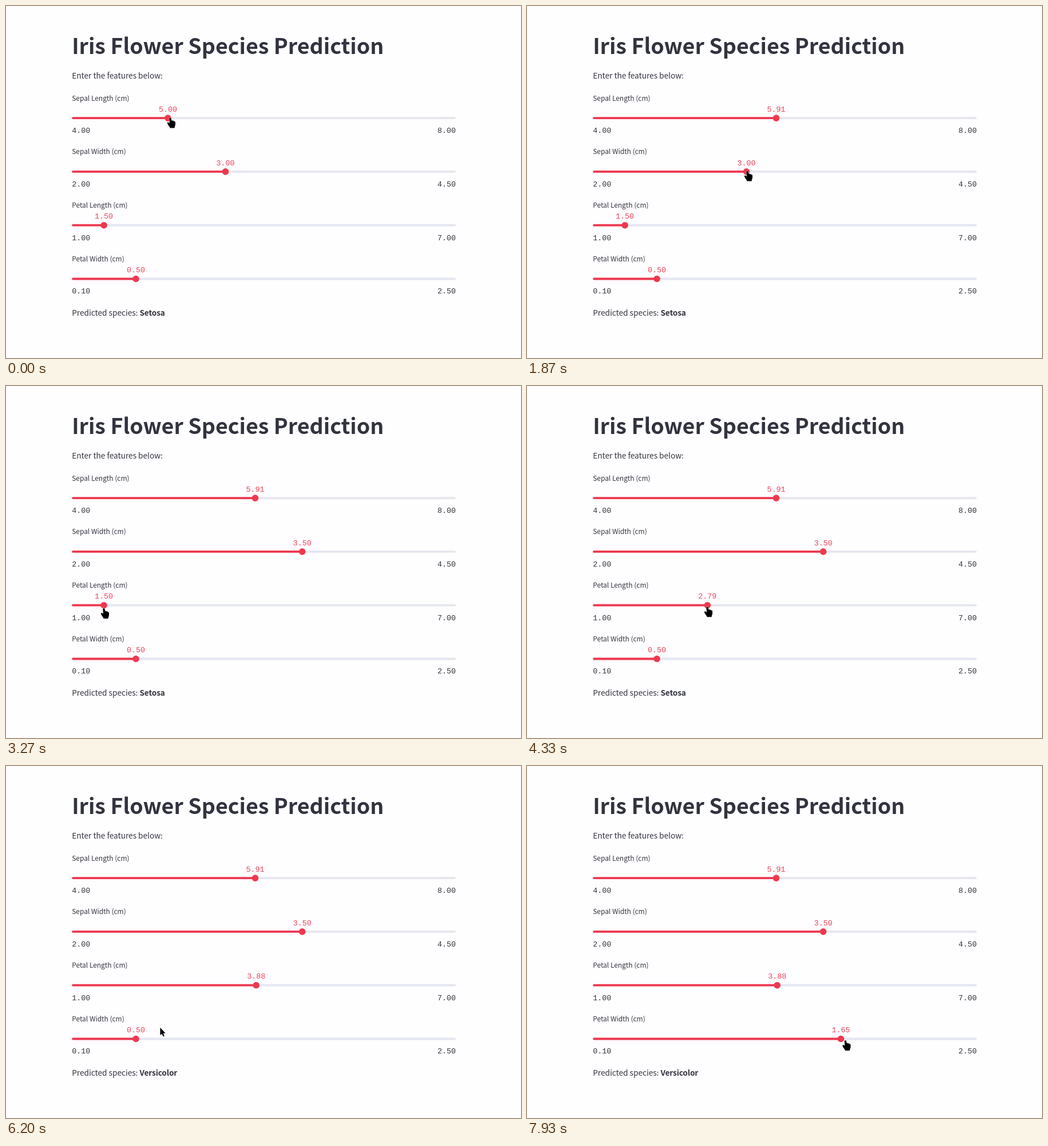
An HTML page for the animation above (8 s loop, 900 px wide and 616 px high).

```html
<!DOCTYPE html>
<html lang="en">
<head>
<meta charset="utf-8">
<title>Iris Flower Species Prediction</title>
<style>
  html, body { margin: 0; width: 100%; height: 100%; overflow: hidden; background: #fefdff; }
  svg { display: block; width: 900px; height: 616px; }
  text { font-family: "Noto Sans CJK JP", "Noto Sans CJK SC", "Noto Sans", sans-serif; fill: #31333f; white-space: pre; }
  .title { font-size: 37.55px; font-weight: 700; }
  .body { font-size: 13.65px; }
  .bold { font-weight: 600; letter-spacing: -0.12px; }
  .label { font-size: 11.95px; }
  .num { font-family: "Liberation Mono", monospace; font-size: 13.34px; }
  .value { fill: #ec4358; text-anchor: middle; }
  .end { text-anchor: end; }
  .cursor { fill: #000; stroke: #fff; stroke-width: 1; paint-order: stroke; stroke-linejoin: round; }
</style>
</head>
<body>
<svg id="stage" viewBox="0 0 900 616"></svg>
<script>
const LOOP = 8000, STEP = 1000 / 15;
const LEFT = 115.2, RIGHT = 786, RED = '#ee384e';
const stage = document.getElementById('stage');

function add(tag, attrs, text) {
  const node = document.createElementNS('http://www.w3.org/2000/svg', tag);
  for (const key in attrs) node.setAttribute(key, attrs[key]);
  if (text !== undefined) node.textContent = text;
  return stage.appendChild(node);
}
const label = (cls, x, y, text) => add('text', { class: cls, x, y }, text);

// Keys are [time, ...values], eased between neighbours.
function at(keys, t) {
  let i = 0;
  while (i < keys.length - 1 && t >= keys[i + 1][0]) i++;
  const a = keys[i], b = keys[i + 1];
  if (!b || t <= a[0]) return a.slice(1);
  const u = (t - a[0]) / (b[0] - a[0]);
  const e = u * u * (3 - 2 * u);
  return a.slice(1).map((v, k) => v + (b[k + 1] - v) * e);
}

const specs = [
  { name: 'Sepal Length (cm)', min: 4, max: 8, keys: [[130, 5], [870, 5.91]] },
  { name: 'Sepal Width (cm)', min: 2, max: 4.5, keys: [[2200, 3], [2600, 3.14], [2800, 3.5]] },
  { name: 'Petal Length (cm)', min: 1, max: 7, keys: [[3700, 1.5], [4900, 3.88]] },
  { name: 'Petal Width (cm)', min: 0.1, max: 2.5, keys: [[6800, 0.5], [7130, 0.91], [7930, 1.65]] }
];

label('title', LEFT, 84, 'Iris Flower Species Prediction');
label('body', LEFT, 127.3, 'Enter the features below:');

const sliders = specs.map((spec, i) => {
  const y = 196.1 + i * 93.8;
  const line = { x1: LEFT + 1.9, y1: y, y2: y, 'stroke-width': 3.8, 'stroke-linecap': 'round' };
  label('label', LEFT, y - 30.6, spec.name);
  add('line', { ...line, x2: RIGHT - 1.9, stroke: '#e4e6f0' });
  label('num', LEFT, y + 25.9, spec.min.toFixed(2));
  label('num end', RIGHT, y + 25.9, spec.max.toFixed(2));
  return {
    ...spec,
    fill: add('line', { ...line, stroke: RED }),
    halo: add('circle', { cy: y, r: 8.8, fill: RED, opacity: 0.5 }),
    thumb: add('circle', { cy: y, r: 5.8, fill: RED }),
    value: label('num value', 0, y - 11.3, '')
  };
});

const result = label('body', LEFT, 542.3, 'Predicted species: ');
const species = document.createElementNS('http://www.w3.org/2000/svg', 'tspan');
species.setAttribute('class', 'bold');
result.appendChild(species);

const arrow = add('path', { class: 'cursor', d: 'M0 0V13.5L3 10.8L5.2 15.8L7.4 14.8L5.3 10L9.2 9.8Z' });
const hand = add('path', { class: 'cursor', d: 'M-1.8 1.6Q-1.6 0 0 0Q1.3 0 1.6 1.4L2.4 5Q4.2 4.4 5 5.6Q6.8 5.2 7.3 6.6Q8.8 6.4 9 8V11.5Q9 14 7.8 15.6L7.6 18H-.6L-1 16.2Q-2.6 14.6-4 12L-5.2 9.6Q-5.4 8-3.8 8Q-2.8 8.2-1 9.6Z' });

const pointer = [
  [130, 287, 195.5], [870, 437, 199], [1070, 435, 206.7], [1700, 385, 288], [2150, 385, 290],
  [2600, 445, 292], [2800, 520, 291], [3200, 171, 389], [3700, 171, 389],
  [4900, 437, 384], [5700, 437, 384], [6400, 228, 476], [6800, 228, 476],
  [7130, 341.5, 474.5], [7930, 556.5, 480]
];
const arrowTimes = [[1000, 1640], [2400, 2740], [2860, 3140], [5800, 6340]];
const within = (t, [from, to]) => t >= from && t < to;

function draw(t) {
  sliders.forEach((s, i) => {
    const value = at(s.keys, t)[0].toFixed(2);
    const x = LEFT + (RIGHT - LEFT) * (value - s.min) / (s.max - s.min);
    s.fill.setAttribute('x2', x);
    s.thumb.setAttribute('cx', x);
    s.halo.setAttribute('cx', x);
    s.halo.setAttribute('visibility', i === 0 && within(t, [870, 1350]) ? 'visible' : 'hidden');
    s.value.setAttribute('x', x);
    s.value.textContent = value;
  });
  species.textContent = t < 4800 ? 'Setosa' : 'Versicolor';

  const isArrow = arrowTimes.some(span => within(t, span));
  const [x, y] = at(pointer, t);
  for (const shape of [arrow, hand]) {
    shape.setAttribute('transform', `translate(${x} ${y})`);
    shape.setAttribute('visibility', (shape === arrow) === isArrow ? 'visible' : 'hidden');
  }
}

const start = performance.now();
function tick() {
  const t = (performance.now() - start) % LOOP;
  draw(Math.floor((t + 4) / STEP) * STEP);
  requestAnimationFrame(tick);
}
draw(0);
tick();
</script>
</body>
</html>
```
